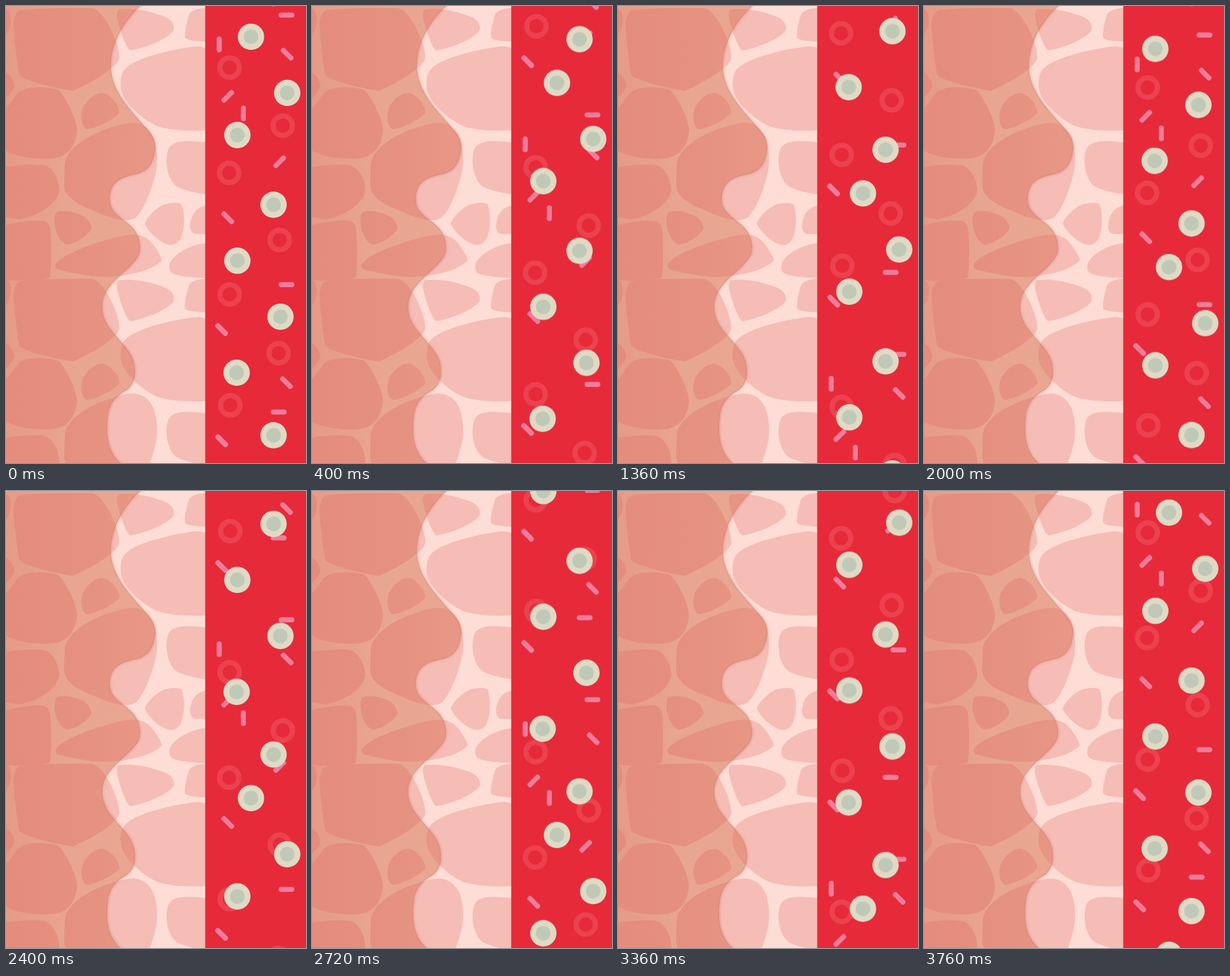
Recreate the animation shown at these times as an HTML page. Size 439 by 668 pixels, loop 3.84 s.

```html
<!DOCTYPE html>
<html lang="en">
<head>
<meta charset="utf-8">
<title>Tissue and bloodstream</title>
<style>
  html, body { margin: 0; width: 100%; height: 100%; overflow: hidden; background: #fdddd5; }
  svg { display: block; width: 439px; height: 668px; }
  .edge { filter: drop-shadow(0 0 2px rgba(185, 95, 75, .6)); }
  .ring { fill: none; stroke: #ec4250; stroke-width: 7.6; }
  .rod { fill: none; stroke: #ef7c9b; stroke-width: 7.5; stroke-linecap: round; }
  .bumpy { stroke-dasharray: 0 3.1; }
  .fast { animation: fast 1920ms steps(24) infinite; }
  .slow { animation: slow 3840ms steps(48) infinite; }
  @keyframes fast { to { transform: translateY(700px); } }
  @keyframes slow { to { transform: translateY(646.3px); } }
</style>
</head>
<body>
<svg viewBox="0 0 439 668">
  <defs>
    <linearGradient id="base" gradientUnits="userSpaceOnUse" x1="0" y1="0" x2="200" y2="0">
      <stop offset="0" stop-color="#e59b87"/>
      <stop offset=".5" stop-color="#e8a692"/>
      <stop offset="1" stop-color="#e9a792"/>
    </linearGradient>
    <linearGradient id="blob" gradientUnits="userSpaceOnUse" x1="0" y1="0" x2="200" y2="0">
      <stop offset="0" stop-color="#e48c7e"/>
      <stop offset=".5" stop-color="#e59080"/>
      <stop offset="1" stop-color="#e89685"/>
    </linearGradient>

    <path id="wave" d="M-20,-20H215L196,0C175,20 153,50 153,90C155,125 180,150 200,173C212,187 219,195 218,208C216,228 210,238 196,244C180,248 165,250 157,262C150,272 150,287 155,296C162,310 185,318 192,335C197,348 198,360 191,369C180,385 155,400 145,420C138,435 139,450 148,466C160,485 180,500 186,518C191,535 189,550 178,560C165,568 153,575 149,598C146,625 147,650 168,669L180,690H-20Z"/>
    <clipPath id="inside"><use href="#wave"/></clipPath>

    <g id="tile">
      <path d="M-5,4Q7,3 7,20Q7,40 -5,43Z"/>
      <path d="M-5,95C5,98 12,108 12,117C10,125 2,134 -5,136Z"/>
      <path d="M22,6Q60,2 125,3C142,4 165,50 166,75C165,88 130,110 98,124C70,120 22,108 19,100C14,70 11,35 11,25Q13,8 22,6Z"/>
      <path d="M15,130C25,115 60,118 75,122C85,128 104,165 104,182C102,205 90,222 65,223C40,225 5,219 -5,207V153C5,146 10,137 15,130Z"/>
      <path d="M140,127C153,128 166,145 166,156C160,165 130,180 118,180C108,175 109,155 114,146Q126,128 140,127Z"/>
      <path d="M86,230C90,205 130,180 180,171C200,169 210,180 216,192C222,212 222,225 220,240C212,275 200,300 190,309C180,316 160,314 130,300C105,290 86,280 85,262Z"/>
      <path d="M-5,236C20,232 50,230 60,234C70,240 78,255 78,270C76,285 55,305 20,312L-5,308Z"/>
      <path d="M75,301C90,297 105,303 115,308C122,313 126,322 125,326C120,335 105,346 90,349C78,347 70,325 71,313Q71,303 75,301Z"/>
      <path d="M-5,322C10,316 45,312 55,314Q64,316 65,330C67,360 66,385 64,397C45,403 20,402 -5,400Z"/>
      <path d="M72,380C75,365 130,345 170,336C195,331 205,337 213,346C222,357 228,368 228,372C215,385 190,393 150,396C120,397 90,388 75,385Z"/>
      <path d="M165,5C185,2 215,8 235,17C245,22 247,30 245,36C235,50 200,62 182,65C175,62 165,30 162,15Q162,7 165,5Z"/>
      <path d="M300,2C285,3 272,5 268,12C264,25 261,38 262,46C265,51 280,51 300,53Z"/>
      <path d="M172,95C185,75 250,62 278,59Q288,58 300,65V181C270,184 240,182 220,175C195,163 170,138 168,120Q166,105 172,95Z"/>
      <path d="M240,205C250,195 270,197 300,200V276C280,274 265,271 250,264C238,255 234,235 235,222Q236,210 240,205Z"/>
      <path d="M232,290C245,287 252,287 257,290C262,305 262,325 255,341C250,348 245,350 238,349C222,345 205,325 203,318C205,310 220,294 232,290Z"/>
      <path d="M300,290C285,292 275,297 271,312C267,322 270,331 276,333L300,334Z"/>
      <path d="M300,346C275,347 250,358 240,375C237,385 240,391 250,393C265,397 285,397 300,398Z"/>
    </g>
    <g id="pattern">
      <use href="#tile"/>
      <use href="#tile" y="395.7"/>
    </g>

    <path id="rod" d="M-7.8,0H7.8"/>
    <g id="cell">
      <circle r="19.3" fill="#e0dac5"/>
      <circle r="10.7" fill="#c0c9b8"/>
    </g>

    <g id="particles">
      <g class="ring">
        <circle cx="327.3" cy="90" r="14.2"/>
        <circle cx="405" cy="175" r="14.2"/>
        <circle cx="326.5" cy="244" r="14.2"/>
        <circle cx="400.5" cy="342" r="14.2"/>
        <circle cx="327.3" cy="421.7" r="14.2"/>
        <circle cx="399" cy="507.5" r="14.2"/>
        <circle cx="328.3" cy="583.7" r="14.2"/>
      </g>
      <g class="rod">
        <use href="#rod" transform="translate(312 56.3) rotate(90)"/>
        <use href="#rod" transform="translate(399 593.5)"/>
        <use href="#rod" transform="translate(315.5 473) rotate(45)"/>
        <use href="#rod" transform="translate(315.7 635.5) rotate(45)"/>
      </g>
      <g class="rod bumpy">
        <use href="#rod" transform="translate(410.5 13.2)"/>
        <use href="#rod" transform="translate(411.5 70.5) rotate(45)"/>
        <use href="#rod" transform="translate(324.6 132) rotate(-45)"/>
        <use href="#rod" transform="translate(347.3 157) rotate(90)"/>
        <use href="#rod" transform="translate(400.5 227.7) rotate(-45)"/>
        <use href="#rod" transform="translate(324.6 309.6) rotate(45)"/>
        <use href="#rod" transform="translate(410.5 407.2)"/>
        <use href="#rod" transform="translate(410.5 550.7) rotate(45)"/>
      </g>
    </g>

    <g id="cells">
      <use href="#cell" x="358.5" y="45"/>
      <use href="#cell" x="411.5" y="127"/>
      <use href="#cell" x="338.5" y="188.6"/>
      <use href="#cell" x="391.5" y="290.5"/>
      <use href="#cell" x="338.5" y="372.3"/>
      <use href="#cell" x="401.6" y="454.2"/>
      <use href="#cell" x="337.5" y="536"/>
      <use href="#cell" x="391.5" y="627.5"/>
    </g>
  </defs>

  <rect width="439" height="668" fill="#fdddd5"/>
  <use href="#pattern" fill="#f5bdb6"/>
  <use class="edge" href="#wave" fill="url(#base)"/>
  <g clip-path="url(#inside)">
    <use href="#pattern" fill="url(#blob)"/>
    <use href="#wave" fill="none" stroke="#cf806f" stroke-opacity=".5" stroke-width="2"/>
  </g>

  <rect x="291.5" width="148" height="668" fill="#e62a39"/>
  <g class="fast">
    <use href="#particles"/>
    <use href="#particles" y="-700"/>
  </g>
  <g class="slow">
    <use href="#cells"/>
    <use href="#cells" y="-646.3"/>
  </g>
</svg>
</body>
</html>
```
